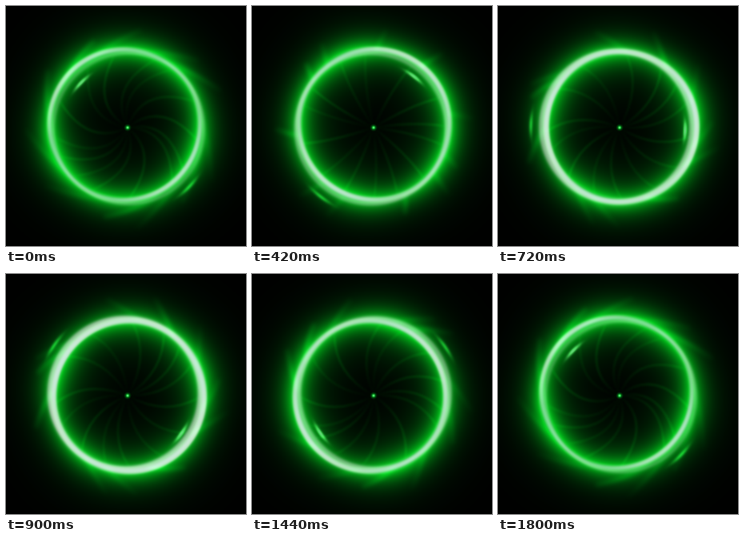
These frames come from a looping animation (300 px wide and 300 px high, 1.86 s). An HTML page with a canvas:

```html
<!DOCTYPE html>
<html>
<head>
<meta charset="utf-8">
<style>
html, body { margin: 0; width: 100%; height: 100%; overflow: hidden; background: #000; }
canvas { display: block; width: 300px; height: 300px; }
</style>
</head>
<body>
<canvas id="stage" width="300" height="300"></canvas>
<script>
const SIZE = 300, MID = 150.8, RADIUS = 94, SHIFT = 4, HUB = 152;
const STEP = 60, LOOP = 1860, TURN = 30;
const { sin, cos, exp, abs, hypot, atan2, PI } = Math;
const ctx = document.getElementById('stage').getContext('2d');
const frames = [];

const bell = (x, width) => exp(-x * x / (width * width));
const noise = i => { const x = sin(i * 127.1 + 3.7) * 43758.5453; return x - Math.floor(x); };
const polar = (r, a, c = MID) => [c + r * cos(a), c + r * sin(a)];

// Angle of the inner glint; the orbit runs slightly uneven.
const glintAngle = p => p + (219.5 + 4.5 * cos(p) + 3.8 * sin(p)) * PI / 180;

// A lens-shaped streak lying along the tangent at the given angle.
function streak(x, y, r, a, length, width) {
  const dx = x - HUB, dy = y - HUB;
  const out = dx * cos(a) + dy * sin(a) - r;
  const along = dy * cos(a) - dx * sin(a);
  if (abs(along) > 40 || abs(out) > 15) return 0;
  return bell(along, length) * bell(out + along * along / (2.6 * r), width);
}

function ringImage(p) {
  const image = ctx.createImageData(SIZE, SIZE);
  const a = glintAngle(p);
  const fill = (1 - cos(p - 0.3)) / 2;
  const outer = 109 - 3 * cos(p);
  for (let y = 0, k = 0; y < SIZE; y++) {
    for (let x = 0; x < SIZE; x++, k += 4) {
      const dx = x + 0.5 - MID, dy = y + 0.5 - MID;
      const r = hypot(dx, dy), t = atan2(dy, dx);
      const d = r - RADIUS, lean = cos(t - a), facing = lean * lean;

      // A bright circle leans towards the glint, a dim one away from it.
      const heat = bell(d - SHIFT * lean, 3.8) * (0.45 + 0.8 * facing)
        + bell(d + SHIFT * lean, 3.6) * 0.4
        + bell(d, 6) * (0.12 + 0.75 * fill);
      const g = d - 3 * lean, e = abs(g);
      const ripple = 1 + 0.08 * sin(3 * t + p) + 0.06 * sin(5 * t - p);
      const glow = ripple * (g < 0
        ? 180 * exp(-e / 11) + 85 * exp(-e / 29)
        : 190 * exp(-e / 11) + 64 * exp(-e / 24));

      const spark = streak(x, y, 81.5, a, 11, 2.2);
      const flare = streak(x, y, outer, a + PI, 14, 2.4);
      const white = 0.92 * (1 - exp(-0.95 * heat * heat)) + 0.42 * spark + 0.1 * flare;
      const green = glow + 150 * spark + 110 * flare;
      image.data[k] = 228 * white;
      image.data[k + 1] = Math.min(green, 195) * (1 - white * 0.5) + 140 * white;
      image.data[k + 2] = green * 0.13 + 205 * white;
      image.data[k + 3] = 255;
    }
  }
  return image;
}

function wisp(from, via, to, alpha, width) {
  ctx.lineWidth = width;
  ctx.globalAlpha = alpha;
  ctx.beginPath();
  ctx.moveTo(...from);
  ctx.quadraticCurveTo(...via, ...to);
  ctx.stroke();
}

function radial(...stops) {
  const g = ctx.createRadialGradient(MID, MID, 0, MID, MID, 135);
  for (const [at, color] of stops) g.addColorStop(at, color);
  return g;
}

function drawWisps(p) {
  const curl = 0.2 + 0.75 * cos(p + 0.2);
  ctx.save();
  ctx.globalCompositeOperation = 'lighter';
  ctx.strokeStyle = radial([0, '#000800'], [0.3, '#004a0a'], [0.6, '#006010'], [0.68, '#000']);
  ctx.filter = 'blur(1.2px)';
  for (let i = 0; i < 14; i++) {
    const a = i * PI / 7 + 0.3 * noise(i) + 0.1 * sin(p + i);
    wisp([HUB, HUB], polar(55, a), polar(90, a + curl * 0.9), 0.14 + 0.14 * noise(i + 40), 3);
  }
  ctx.strokeStyle = radial([0.68, '#000'], [0.76, '#006814'], [0.84, '#003c0a'], [0.97, '#000']);
  ctx.filter = 'blur(2.5px)';
  for (let i = 0; i < 11; i++) {
    const a = i * PI / 5.5 + 0.4 * noise(i + 80) + 0.12 * sin(p + i * 2);
    const reach = 114 + 16 * noise(i + 120);
    wisp(polar(94, a), polar(106, a + curl * 0.35), polar(reach, a + curl * 0.75),
      0.2 + 0.3 * noise(i + 160), 5);
  }
  ctx.restore();
}

function drawHub() {
  const g = ctx.createRadialGradient(HUB, HUB, 0, HUB, HUB, 5);
  g.addColorStop(0, '#90f8a0');
  g.addColorStop(0.25, '#20d040');
  g.addColorStop(0.55, 'rgba(0,110,20,.6)');
  g.addColorStop(1, 'rgba(0,60,10,0)');
  ctx.fillStyle = g;
  ctx.fillRect(HUB - 5, HUB - 5, 10, 10);
}

let shown = -1;
function draw(now) {
  const step = Math.floor(now % LOOP / STEP) % TURN;
  if (step !== shown) {
    const p = step / TURN * 2 * PI;
    frames[step] ||= ringImage(p);
    ctx.putImageData(frames[step], 0, 0);
    drawWisps(p);
    drawHub();
    shown = step;
  }
}

const start = performance.now();
function tick() {
  draw(performance.now() - start);
  requestAnimationFrame(tick);
}
tick();
</script>
</body>
</html>
```
